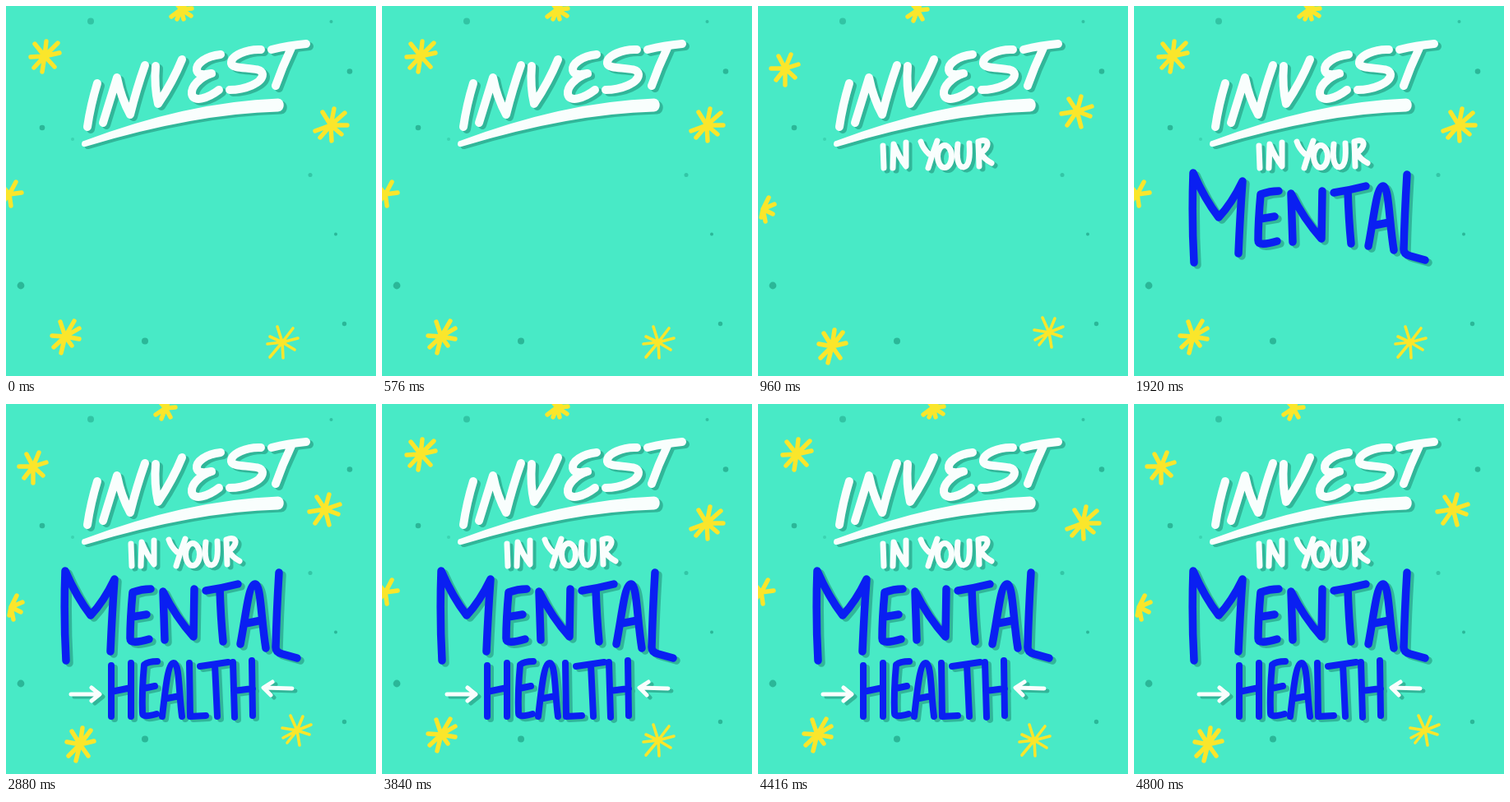
An HTML page for the animation above (5760 ms loop, 450 px wide and 450 px high).

```html
<!DOCTYPE html>
<html lang="en">
<head>
<meta charset="utf-8">
<title>Invest in your mental health</title>
<style>
  html, body { margin: 0; width: 100%; height: 100%; overflow: hidden; background: #48eac6; }
  svg { display: block; width: 100vw; height: 100vh; }
  .ink { fill: none; stroke: #f9fefd; stroke-linecap: round; stroke-linejoin: round; filter: drop-shadow(4px 3.5px 0 #31b699); }
  .blue { stroke: #0a1ff2; }
  .word { animation: 5.76s step-end infinite; }
  .your { animation-name: second; }
  .mental { animation-name: third; }
  .health { animation-name: fourth; }
  .stars { fill: none; stroke: #fae62b; stroke-width: 5.4; stroke-linecap: round; stroke-linejoin: round; animation: 1.92s step-end infinite; }
  .stars .thin { stroke-width: 3.6; }
  .a { animation-name: first-half; }
  .b { animation-name: last-half; }
  /* percentages sit just below the exact sixths so changes are never late */
  @keyframes second { 0% { visibility: hidden } 16.666%, 100% { visibility: visible } }
  @keyframes third { 0% { visibility: hidden } 33.333%, 100% { visibility: visible } }
  @keyframes fourth { 0% { visibility: hidden } 50%, 100% { visibility: visible } }
  @keyframes first-half { 0% { visibility: visible } 50%, 100% { visibility: hidden } }
  @keyframes last-half { 0% { visibility: hidden } 50%, 100% { visibility: visible } }
</style>
</head>
<body>
<svg viewBox="0 0 450 450" role="img" aria-label="Invest in your mental health">
  <g fill="#2bb798">
    <circle cx="103" cy="18.500" r="4" opacity=".75"/>
    <circle cx="395.500" cy="19" r="2" opacity=".8"/>
    <circle cx="418" cy="79.500" r="3.300"/>
    <circle cx="44" cy="148" r="3.300"/>
    <circle cx="81" cy="162" r="2" opacity=".45"/>
    <circle cx="370" cy="205.500" r="2.500" opacity=".7"/>
    <circle cx="401" cy="277.500" r="2"/>
    <circle cx="18" cy="340" r="4.400"/>
    <circle cx="411.500" cy="386.500" r="2.700"/>
    <circle cx="169" cy="407.500" r="4"/>
  </g>

  <g class="stars a">
    <path d="M35 46L47 61L59 74M49 43L47 61L44 80M63 45L47 61L34 75M65 57L47 61L30 62"/>
    <path d="M201 13L213 4L225 12M208 16L213 4L216 16M226 3L213 4L203-8M213 4L223-8"/>
    <path d="M385 129L395 145L408 156M399 125L395 145L396 164M412 130L395 145L382 160M415 145L395 145L376 152"/>
    <path d="M12 214L4 229L6 243M19 227L4 229L-10 231M4 229L-6 217M4 229L-6 241"/>
    <path d="M66 384L72 402L80 413M83 383L72 402L67 422M89 392L72 402L58 415M89 405L72 402L56 401"/>
    <path class="thin" d="M330 390L336 409L337 428M349 392L336 409L321 427M355 404L336 409L318 411M351 418L336 409L321 402"/>
  </g>

  <g class="stars b">
    <path d="M25 61L33 76L45 87M40 59L33 76L33 96M49 71L33 76L22 90M33 76L16 76"/>
    <path d="M182 13L194 5L200 16M189 18L194 5L206 4M194 5L200-8M194 5L184-6"/>
    <path d="M378 113L388 128L393 147M393 110L388 128L376 145M406 122L388 128L369 131M404 134L388 128"/>
    <path d="M13 233L6 247L9 262M20 241L6 247L18 253M6 247L4 257"/>
    <path d="M80 398L90 414L100 428M93 394L90 414L85 434M103 397L90 414L76 428M107 410L90 414L74 411"/>
    <path class="thin" d="M346 379L354 397L357 415M361 380L354 397L342 412M371 390L354 397L337 406M369 402L354 397L336 394"/>
  </g>

  <g class="ink" stroke-width="10">
    <path d="M111 94Q103 120 99 147"/>
    <path d="M118 142Q127 113 135 87Q140 112 151 132Q159 100 169 72"/>
    <path d="M182 73Q180 98 185 119Q203 92 214 65"/>
    <path d="M261 59C243 61 231 70 232 78C233 84 241 84 250 82C235 87 225 98 226 107C228 118 246 112 259 102"/>
    <path d="M310 53C294 52 273 60 274 70C276 79 311 72 312 83C312 94 290 102 272 102"/>
    <path d="M323 53Q343 48 365 46M347 51Q336 74 328 97"/>
    <path fill="#f9fefd" stroke-width="3" d="M94 166C168 138 250 117 331 114C338 114 338 127 331 127C250 129 168 148 98 169Q92 171 94 166Z"/>
  </g>

  <g class="ink word your" stroke-width="7">
    <path d="M152 170L153 197"/>
    <path d="M164 197L165 168Q171 183 180 195L180 166"/>
    <path d="M198 165Q201 174 208 180M218 164Q212 180 207 197"/>
    <ellipse cx="227" cy="183" rx="8.500" ry="13.500"/>
    <path d="M243 168C241 184 243 196 250 196C257 195 258 183 257 167"/>
    <path d="M268 165L269 195M268 165C280 160 284 169 271 179Q275 186 284 191"/>
  </g>

  <g class="ink blue word mental" stroke-width="9.500">
    <path d="M73 312Q70 258 72 203Q86 235 103 257Q119 240 132 213Q129 254 127 301"/>
    <path d="M176 225Q165 225 154 229Q151 262 151 285Q151 293 174 286M153 259L171 256"/>
    <path d="M193 287L191 228Q207 260 228 283L229 225"/>
    <path d="M243 227Q262 224 282 219M260 224Q261 258 264 289"/>
    <path d="M285 292C292 256 295 219 303 219C310 219 310 260 316 297M291 267L311 263"/>
    <path d="M332 205Q329 255 328 296Q328 302 336 304L354 309"/>
  </g>

  <g class="word health">
    <g class="ink blue" stroke-width="8">
      <path d="M128 318L128 380M152 315L152 380M128 350L152 345"/>
      <path d="M184 313Q173 313 168 317Q165 350 166 376Q166 382 183 377M167 346L181 343"/>
      <path d="M190 380C194 345 197 315 204 315C211 315 210 350 214 380M196 358L211 355"/>
      <path d="M223 315L224 380L243 379"/>
      <path d="M236 319L270 314M254 317L257 380"/>
      <path d="M276 314L278 381M299 312L300 379M277 349L300 346"/>
    </g>
    <g class="ink" stroke-width="5">
      <path d="M79 353H113M104 345L114 353L104 361"/>
      <path d="M348 346L314 345M324 338L313 345L322 354"/>
    </g>
  </g>
</svg>
</body>
</html>
```
